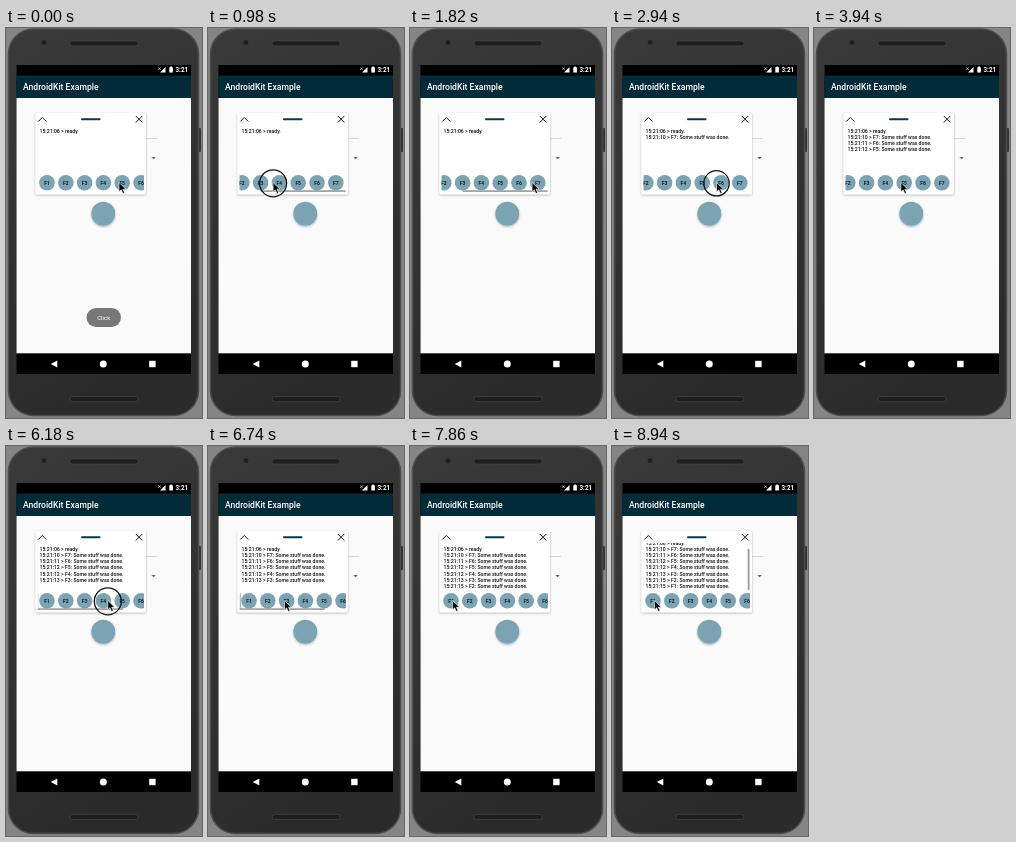
An HTML page for the animation above (9020 ms loop, 196 by 390 pixels).

```html
<!DOCTYPE html>
<html lang="en">
<head>
<meta charset="utf-8">
<style>
  html, body { margin: 0; width: 100%; height: 100%; overflow: hidden; background: #858585; }
  svg { display: block; width: 196px; height: 390px; font-family: Roboto, "Noto Sans", sans-serif; }
  .log { font-size: 5.15px; font-weight: 500; fill: #111; }
  .chip { font-size: 5px; font-weight: 700; fill: #0c2028; text-anchor: middle; }
</style>
</head>
<body>
<svg viewBox="0 0 196 390">
  <defs>
    <clipPath id="logClip"><rect x="31" y="97" width="107" height="47"/></clipPath>
    <clipPath id="rowClip"><rect x="31.5" y="145" width="106.5" height="20"/></clipPath>
    <filter id="shadow" x="-20%" y="-20%" width="140%" height="150%">
      <feDropShadow dx="0" dy="1" stdDeviation="1.3" flood-opacity=".3"/>
    </filter>
    <linearGradient id="body" x2=".3" y2="1">
      <stop stop-color="#3a3a3b"/><stop offset="1" stop-color="#2b2b2c"/>
    </linearGradient>
  </defs>

  <!-- phone -->
  <rect x="192" y="100" width="3" height="24" rx="1" fill="#333"/>
  <rect x="2.500" y="1" width="190" height="386.500" rx="25" fill="url(#body)" stroke="#4c4c4d" stroke-width="1.500"/>
  <g fill="#1f1f20" stroke="#48484a" stroke-width=".6">
    <circle cx="38" cy="14.500" r="3"/>
    <rect x="64" y="13" width="68" height="5" rx="2.500"/>
    <rect x="64" y="368.500" width="68" height="5" rx="2.500"/>
  </g>
  <rect x="10.500" y="37" width="174.500" height="309"/>
  <rect x="10.500" y="47.500" width="174.500" height="22.500" fill="#022b3a"/>
  <rect x="10.500" y="70" width="174.500" height="255.300" fill="#fafafa"/>
  <g fill="#fff">
    <path d="M154 44.500h5.500v-5.500z"/>
    <path d="M152.300 39.500l2.400 2.400m0-2.400l-2.400 2.400" stroke="#fff" stroke-width=".7"/>
    <path d="M163.300 39.300h1v-.8h1.600v.8h1v5.200h-3.600z"/>
    <text x="169.500" y="44.200" font-size="6.300" font-weight="700">3:21</text>
    <text x="17" y="61.700" font-size="8.600" font-weight="500">AndroidKit Example</text>
    <path d="M51.300 332.400v7.200l-6.500-3.600z"/>
    <circle cx="97.300" cy="336" r="3.500"/>
    <rect x="143.200" y="332.800" width="6.400" height="6.400"/>
  </g>

  <!-- page -->
  <path d="M139 110.500h12" stroke="#c8c8c8" stroke-width=".7"/>
  <path d="M145.300 129h4.600l-2.300 2.300z" fill="#666"/>
  <circle cx="97.300" cy="185.700" r="12" fill="#7ba3b1" filter="url(#shadow)"/>
  <g id="toast">
    <rect x="80.500" y="280" width="34.500" height="19" rx="9.500" fill="#777"/>
    <text x="97.700" y="291.700" font-size="6" fill="#fff" text-anchor="middle">Click</text>
  </g>

  <!-- console -->
  <rect x="29.500" y="85" width="110.500" height="81.300" rx="1" fill="#fff" filter="url(#shadow)"/>
  <path d="M32.300 93.500l4-4 4 4M129.800 88l6.500 6.500m0-6.500l-6.500 6.500" fill="none" stroke="#111"/>
  <path d="M76 91.300h17.500" stroke="#06384a" stroke-width="2" stroke-linecap="round"/>
  <g clip-path="url(#logClip)"><g id="log"></g></g>
  <rect id="vbar" x="135.700" y="103" width="1.800" height="41" fill="#999"/>
  <g clip-path="url(#rowClip)"><g id="chips"></g></g>
  <path id="glow" d="M32.300 147v16" stroke="#9bb0b8"/>
  <rect id="hbar" y="162.300" width="85" height="1.600" fill="#999"/>

  <!-- pointer -->
  <circle id="ring" fill="none" stroke="#111" stroke-width="1.300"/>
  <path id="cursor" d="M0 0v9.300l2.200-2 1.600 3.700 1.700-.8-1.600-3.500h3z" fill="#000" stroke="#fff" stroke-width=".6"/>
</svg>
<script>
const LOOP = 9020, MAX_SCROLL = 26, LINE = 6.15, PITCH = 18.8, TIP_Y = 154.5;
const $ = id => document.getElementById(id);
const clamp = (v, lo = 0, hi = 1) => Math.min(hi, Math.max(lo, v));
const ramp = (t, a, b) => clamp((t - a) / (b - a));
const ease = p => p * p * (3 - 2 * p);
const glide = (t, a, b, from, to) => from + (to - from) * ease(ramp(t, a, b));

function add(parent, tag, attrs, text = '') {
  const el = document.createElementNS('http://www.w3.org/2000/svg', tag);
  for (const k in attrs) el.setAttribute(k, attrs[k]);
  el.textContent = text;
  return parent.appendChild(el);
}

// F7 to F3 are pressed with the row scrolled, F2 and F1 after dragging it back.
const clicks = [7, 6, 5, 4, 3, 2, 1].map((n, i) => {
  const start = n > 2 ? 2040 + 830 * i : 7230 + 830 * (2 - n);
  const x = 42.5 + 17.6 * (n - 1) - (n > 2 ? MAX_SCROLL : 0);
  return {n, start, end: start + 160, from: x, to: x};
});
const dragOut = {start: 480, end: 1290, from: 113, to: 42};
const dragBack = {start: 5800, end: 6460, from: 52, to: 133};
const actions = [dragOut, ...clicks, dragBack].sort((a, b) => a.start - b.start);

// The pointer rests briefly after each action, then moves on to the next.
function pointerX(t) {
  let x = dragOut.from, left = 0;
  for (const a of actions) {
    x = glide(t, left + 80, left + 370, x, a.from);
    x = glide(t, a.start, a.end, x, a.to);
    left = a.end;
  }
  return x;
}

const dragged = (t, d) => Math.min(MAX_SCROLL, Math.abs(glide(t, d.start, d.end, 0, d.to - d.from)));

const addLine = (i, text) => add($('log'), 'text', {class: 'log', x: 33.5, y: 105 + i * LINE}, text);
addLine(0, '15:21:06 > ready.');
clicks.forEach((c, i) => {
  const second = Math.floor(9 + .85 * c.start / 1000);
  c.line = addLine(i + 1, `15:21:${second} > F${c.n}: Some stuff was done.`);
});

for (let i = 0; i < 7; i++) {
  const x = 41 + PITCH * i;
  add($('chips'), 'circle', {cx: x, cy: 154.7, r: 7.8, fill: '#7ba3b1'});
  add($('chips'), 'text', {class: 'chip', x, y: 156.5}, 'F' + (i + 1));
}

function draw(t) {
  const x = pointerX(t);
  const scroll = dragged(t, dragOut) - dragged(t, dragBack);
  const flash = (a, b) => ramp(t, a, a + 80) * (1 - ramp(t, b, b + 250));
  const show = (el, on) => el.style.display = on ? '' : 'none';

  $('chips').setAttribute('transform', `translate(${-scroll})`);
  $('hbar').setAttribute('x', 31.8 + scroll * .8);
  $('hbar').style.opacity = [dragOut, dragBack].reduce((o, d) => o + flash(d.start, d.end + 580), 0);
  $('glow').style.opacity = flash(dragBack.start + 350, dragBack.end + 300);
  $('toast').style.opacity = 1 - ramp(t, 250, 650);

  for (const c of clicks) show(c.line, t >= c.end);
  const full = t >= clicks[6].end;
  $('log').setAttribute('transform', `translate(0 ${full ? -LINE : 0})`);
  show($('vbar'), full);

  const press = actions.find(a => t >= a.start && t < a.end);
  show($('ring'), press);
  if (press) {
    $('ring').setAttribute('r', 6 + 7.5 * ramp(t, press.start, press.start + 80));
    $('ring').setAttribute('transform', `translate(${x} ${TIP_Y + .8})`);
  }
  $('cursor').setAttribute('transform', `translate(${x} ${TIP_Y})`);
}

const start = performance.now();
function tick() {
  draw((performance.now() - start) % LOOP);
  requestAnimationFrame(tick);
}
tick();
</script>
</body>
</html>
```
